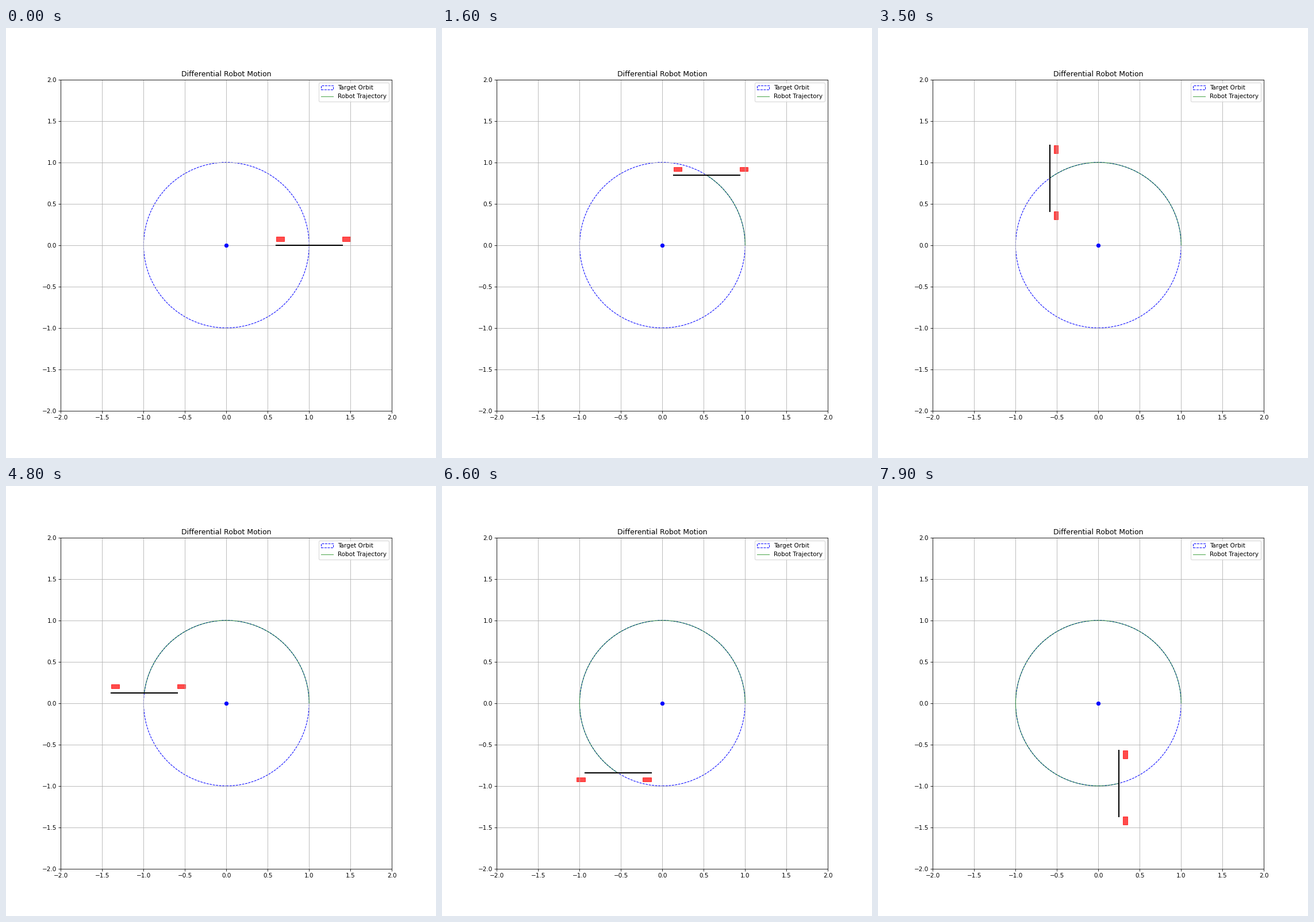
Recreate the animation shown at these times as a matplotlib script. Size 748 px wide and 748 px high, loop 8 s.

```python
import numpy as np
import matplotlib.pyplot as plt
from matplotlib.animation import FuncAnimation
from matplotlib.patches import Circle, Rectangle

FRAMES = 80
INTERVAL = 100           # ms
STEP = 2 * np.pi / 100   # orbit angle per frame
HALF_AXLE = 0.4
WHEEL_GAP = 0.05
WHEEL_SIZE = (0.1, 0.05)

fig, ax = plt.subplots(figsize=(10, 10), dpi=74.8)
ax.set_xlim(-2, 2)
ax.set_ylim(-2, 2)
ax.set_aspect("equal")
ax.grid(True)
ax.set_title("Differential Robot Motion")

ax.add_patch(Circle((0, 0), 1, color="blue", fill=False,
                    linestyle="--", label="Target Orbit"))
ax.plot(0, 0, "bo")
trail, = ax.plot([], [], "g-", lw=1, alpha=0.7, label="Robot Trajectory")
axle, = ax.plot([], [], "k-", lw=2)
wheels = [ax.add_patch(Rectangle((0, 0), *WHEEL_SIZE, color="red", alpha=0.7))
          for _ in range(2)]
ax.legend(loc="upper right")


def update(i):
    path = STEP * np.arange(i + 1)
    xs, ys = np.cos(path), np.sin(path)
    trail.set_data(xs, ys)

    # The body makes a quarter turn on every step.
    turn = i % 4
    c, s = [(1, 0), (0, 1), (-1, 0), (0, -1)][turn]

    def place(u, v):
        return xs[-1] + c * u - s * v, ys[-1] + s * u + c * v

    axle.set_data(*zip(place(-HALF_AXLE, 0), place(HALF_AXLE, 0)))
    for wheel, u in zip(wheels, (-HALF_AXLE, HALF_AXLE)):
        wheel.set_xy(place(u, WHEEL_GAP))
        wheel.set_angle(90 * turn)
    return trail, axle, *wheels


anim = FuncAnimation(fig, update, frames=FRAMES, interval=INTERVAL,
                     repeat=True, repeat_delay=0, blit=False)
plt.show()
```
